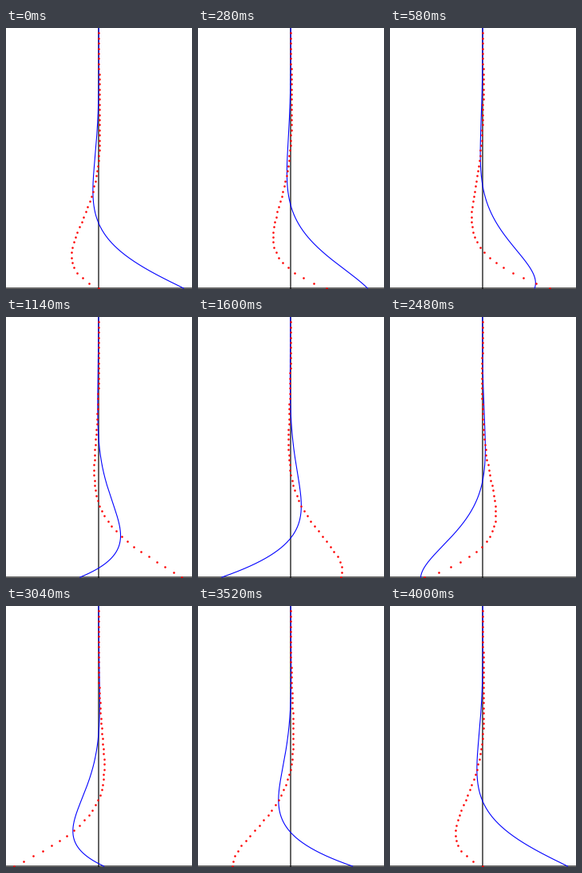
These frames come from a looping animation (233 px wide and 327 px high, 4.02 s). A matplotlib script:

```python
import numpy as np
import matplotlib.pyplot as plt
from matplotlib.animation import FuncAnimation

W, H, DPI = 233, 327, 64
PX = 72 / DPI                      # one pixel in points
FRAMES, STEP_MS = 201, 20

X0, Y0 = 116, 326                  # foot of the damped wave
AMP = 106.4
DEPTH = 326 / (2 * np.pi)          # skin depth in pixels

fig = plt.figure(figsize=(W / DPI, H / DPI), dpi=DPI, facecolor="white")
ax = fig.add_axes([0, 0, 1, 1])
ax.set(xlim=(0, W), ylim=(H, 0))
ax.axis("off")

axis_style = dict(color="black", lw=1.2 * PX, snap=False)
ax.plot([X0, X0], [0, H], **axis_style)
ax.plot([0, W], [Y0, Y0], **axis_style)

s_line = np.linspace(0, 2 * np.pi, 400)
s_dots = np.arange(51) * 2 * np.pi / 51

wave, = ax.plot([], [], color="blue", lw=1.1 * PX, snap=False)
dots, = ax.plot([], [], "o", color="red", ms=2.6 * PX, mew=0, snap=False)


def place(artist, s, phase):
    x = X0 + AMP * np.exp(-s) * np.cos(phase - s)
    artist.set_data(x, Y0 - DEPTH * s)


def update(i):
    phase = 2 * np.pi * i / (FRAMES - 1)
    place(wave, s_line, phase)
    place(dots, s_dots, phase - np.pi / 2)
    return wave, dots


anim = FuncAnimation(fig, update, frames=FRAMES, interval=STEP_MS,
                     repeat=True, repeat_delay=0)
plt.show()
```
